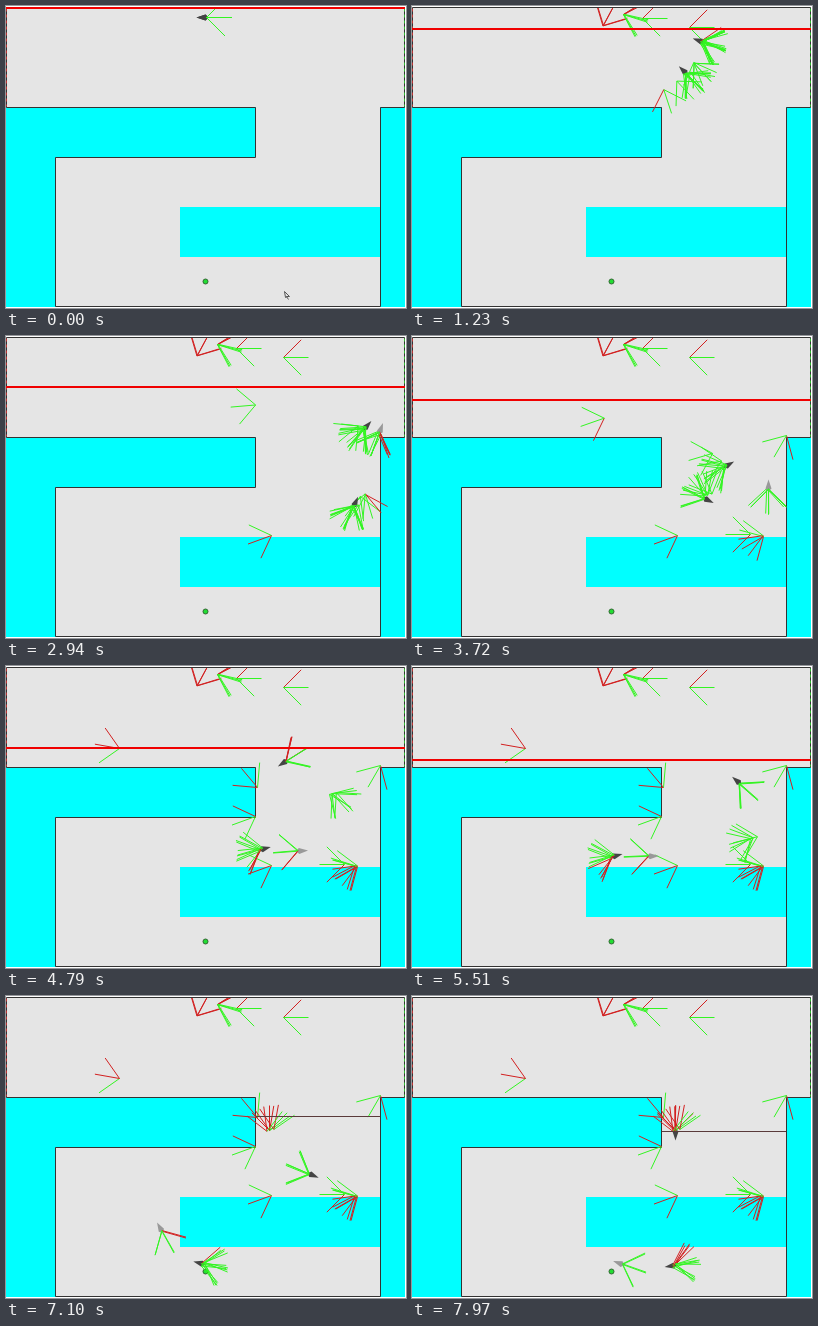
Recreate the animation shown at these times as an HTML page with a canvas. Size 400 px wide and 302 px high, loop 8 s.

```html
<!DOCTYPE html>
<html lang="en">
<head>
<meta charset="utf-8">
<title>Maze swarm</title>
<style>
  html, body { margin: 0; width: 100%; height: 100%; overflow: hidden; background: #fff; }
  canvas { display: block; width: 100vw; height: 100vh; }
</style>
</head>
<body>
<canvas width="400" height="302"></canvas>
<script>
const ctx = document.querySelector('canvas').getContext('2d');
const LOOP = 8000, STEP = 30;
const SPEED = 0.076; // pixels per ms
const REACH = 25, RAD = Math.PI / 180;
const GREEN = '#33f522', RED = '#d22020', DARK = '#444', GREY = '#999', EDGE = '#333';
const robots = [];

let seed = 7;
const random = () => (seed = seed * 16807 % 2147483647) / 2147483647;
const jitter = range => (random() * 2 - 1) * range;

// Samples a Hermite leg between two poses, tangent to their headings
function sampleLeg([x0, y0, h0], [x1, y1, h1], samples) {
  const pull = Math.hypot(x1 - x0, y1 - y0);
  const blend = (a, b, m, n, u) => ({
    at: a + (b - a) * u * u * (3 - 2 * u) + m * u * (1 - u) ** 2 - n * u * u * (1 - u),
    slope: 6 * (b - a) * u * (1 - u) + m * (1 - u) * (1 - 3 * u) + n * u * (3 * u - 2)
  });
  for (let u = 0; u <= 1; u += 1 / 64) {
    const x = blend(x0, x1, pull * Math.cos(h0 * RAD), pull * Math.cos(h1 * RAD), u);
    const y = blend(y0, y1, pull * Math.sin(h0 * RAD), pull * Math.sin(h1 * RAD), u);
    const last = samples[samples.length - 1];
    const travelled = last ? last.travelled + Math.hypot(x.at - last.x, y.at - last.y) : 0;
    samples.push({ x: x.at, y: y.at, heading: Math.atan2(y.slope, x.slope), travelled });
  }
}

// Every robot sets out from the same pose, drives at one speed and stops at its last pose
function swarm(count, poses, { spread = 0, turn = 0, body = null } = {}) {
  const track = [];
  [[200, 11, 0], ...poses].reduce((from, to) => {
    sampleLeg(from, to, track);
    return to;
  });
  for (let i = 0; i < count; i++) {
    const vary = i > 0 ? 1 : 0;
    robots.push({
      track,
      body: vary ? null : body,
      dx: jitter(spread) * vary,
      dy: jitter(spread) * vary,
      turn: jitter(turn) * vary * RAD
    });
  }
}

// Shared stretches, as [x, y, heading in degrees]
const upper = [[294, 37, 20], [368, 54, 5]];
const inner = [[278, 71, 42], [320, 139, 55], [345, 172, 150], [305, 168, 205]];
const rightSide = [...upper, [356, 153, 90]];

// Crashes along the top
swarm(2, [[211, 30, 170], [191, 19, -62]], { spread: 1, turn: 8 });
swarm(3, [[211, 8, 15]], { spread: 2, turn: 35 });
swarm(1, [[230, 12, 0]]);
swarm(1, [[277, 21, 0]]);

// Stragglers that stop at a wall
swarm(1, [[255, 94, 70], [274, 168, 90], [265, 199, 160]]);
swarm(1, [[270, 80, 40], [314, 88, 230], [188, 83, 160], [113, 82, 190]]);
swarm(1, [...upper, [374, 99, 120]]);
swarm(1, [[338, 121, 45], [338, 198, 180]]);
swarm(2, [[338, 121, 45], [351, 200, 150]], { spread: 2, turn: 25 });
swarm(2, [...rightSide, [350, 200, 150]], { spread: 2, turn: 20 });
swarm(1, [...upper, [304, 116, 170], [249, 150, 160]]);
swarm(1, [...upper, [312, 124, 170], [251, 121, 230]]);

// Groups that keep going
swarm(2, [...rightSide, [308, 184, 180], [192, 184, 200], [152, 222, 90], [210, 268, 20]],
  { spread: 1, turn: 3, body: GREY });
swarm(3, [...inner, [272, 140, -90], [277, 97, -50], [325, 115, 40], [356, 164, 80],
  [325, 184, 190], [263, 134, -90]], { spread: 1, turn: 6, body: DARK });
swarm(4, [...inner, [295, 117, -20], [343, 170, 150], [263, 134, -90]],
  { spread: 5, turn: 25 });
swarm(5, [...upper, [313, 130, 150], [247, 184, 180], [158, 226, 98], [185, 264, 20], [262, 269, -8]],
  { spread: 2, turn: 14, body: DARK });

function poseAt({ track, dx, dy, turn }, time) {
  const goal = track[track.length - 1];
  const spot = track.find(sample => sample.travelled >= time * SPEED) || goal;
  const drift = Math.min(1, spot.travelled / 45);
  return {
    x: spot.x + dx * drift,
    y: spot.y + dy * drift,
    heading: spot.heading + turn * drift,
    sensed: Math.min(time, goal.travelled / SPEED)
  };
}

const lineY = time => 2 + time / 60;

function blocked(x, y) {
  return x < 0 || x > 398 || y < 2 || y > 300 ||
    (y > 101 && (x < 50 || x > 374)) ||
    (y > 101 && y < 151 && x < 250) ||
    (y > 201 && y < 251 && x > 174);
}

function drawRobot(robot, time) {
  const { x, y, heading, sensed } = poseAt(robot, time);
  ctx.save();
  ctx.translate(x + 0.5, y + 0.5);
  for (const side of [-45, 0, 45]) {
    const dx = Math.cos(heading + side * RAD) * REACH;
    const dy = Math.sin(heading + side * RAD) * REACH;
    const hit = sensed >= STEP && (y + dy < lineY(sensed) ||
      [0.5, 0.75, 1].some(k => blocked(x + dx * k, y + dy * k)));
    ctx.strokeStyle = hit ? RED : GREEN;
    ctx.beginPath();
    ctx.moveTo(0, 0);
    ctx.lineTo(dx, dy);
    ctx.stroke();
  }
  if (robot.body) {
    ctx.rotate(heading);
    ctx.fillStyle = robot.body;
    ctx.beginPath();
    ctx.moveTo(-10, 0);
    ctx.lineTo(-1, -3);
    ctx.lineTo(2, 0);
    ctx.lineTo(-1, 3);
    ctx.fill();
  }
  ctx.restore();
}

function rect(colour, x, y, w, h) {
  ctx.fillStyle = colour;
  ctx.fillRect(x, y, w, h);
}

function stroke(colour, ...points) {
  ctx.strokeStyle = colour;
  ctx.beginPath();
  for (const [x, y] of points) ctx.lineTo(x + 0.5, y + 0.5);
  ctx.stroke();
}

function drawMaze() {
  rect('#fff', 0, 0, 400, 302);
  rect('#e5e5e5', 0, 1, 399, 300);
  rect('#0ff', 0, 101, 250, 50);
  rect('#0ff', 0, 151, 50, 150);
  rect('#0ff', 374, 101, 25, 200);
  rect('#0ff', 174, 201, 200, 50);
  stroke(EDGE, [0, 101], [249, 101], [249, 151], [49, 151], [49, 300], [374, 300], [374, 101], [398, 101]);
  stroke(EDGE, [0, 101], [0, 1], [398, 1], [398, 101]);
  ctx.setLineDash([3, 3]);
  stroke('#b33', [0, 2], [0, 100]);
  stroke('#3b3', [398, 2], [398, 100]);
  ctx.setLineDash([]);
  ctx.fillStyle = '#2d3';
  ctx.strokeStyle = '#363';
  ctx.beginPath();
  ctx.arc(199.5, 275.5, 2.5, 0, Math.PI * 2);
  ctx.fill();
  ctx.stroke();
}

function drawLine(time) {
  const y = Math.round(lineY(time));
  if (y < 101) rect('#f00000', 0, y - 1, 399, 2);
  else rect('#5a3a3a', 250, y, 124, 1);
}

function drawPointer(time) {
  if (time > 600) return;
  const y = 285 + time / 35;
  stroke('#555', [278, y], [283, y + 5], [280, y + 5], [282, y + 8]);
  stroke('#555', [278, y], [279, y + 6], [281, y + 5]);
}

function frame(now) {
  const time = Math.floor(now % LOOP / STEP) * STEP;
  drawMaze();
  ctx.save();
  ctx.beginPath();
  ctx.rect(0, 2, 399, 299);
  ctx.clip();
  for (const robot of robots) drawRobot(robot, time);
  drawPointer(time);
  ctx.restore();
  drawLine(time);
  requestAnimationFrame(frame);
}
requestAnimationFrame(frame);
</script>
</body>
</html>
```
